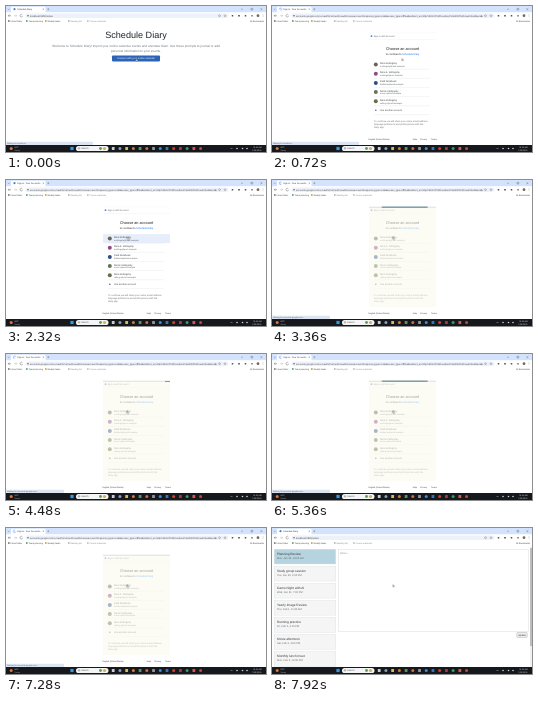
An HTML page for the animation above (8 s loop, 260 by 146 pixels).

```html
<!DOCTYPE html>
<html lang="en">
<head>
<meta charset="utf-8">
<title>Schedule Diary</title>
<style>
  html, body { margin: 0; width: 100%; height: 100%; overflow: hidden; background: #fff; }
  svg { display: block; }
  #stage { width: 260px; height: 146px; }
  text { font-family: Roboto, Arial, sans-serif; text-rendering: geometricPrecision; white-space: pre; }
  .plain { font-family: "Liberation Sans", Arial, sans-serif; }
  .bar rect { transform-box: fill-box; transform-origin: center; }
  #spin { transform-origin: 8.5px 3.2px; }
</style>
</head>
<body>
<svg id="stage" viewBox="0 0 260 146"></svg>
<script>
const LOOP = 8000;
const stage = document.getElementById('stage');

function add(parent, tag, attrs = {}) {
  const el = document.createElementNS('http://www.w3.org/2000/svg', tag);
  for (const k in attrs) el.setAttribute(k, attrs[k]);
  parent.append(el);
  return el;
}
const group = (p, attrs) => add(p, 'g', attrs);
const rect = (p, x, y, width, height, fill, more) => add(p, 'rect', { x, y, width, height, fill, ...more });
const dot = (p, cx, cy, r, fill) => add(p, 'circle', { cx, cy, r, fill });
const line = (p, d, stroke, width = 0.4) =>
  add(p, 'path', { d, stroke, 'stroke-width': width, fill: 'none' });
function text(p, x, mid, size, str, fill = '#444', more) {
  const el = add(p, 'text', { x, y: mid + size * 0.35, 'font-size': size, fill, ...more });
  el.textContent = str;
  return el;
}
const centered = { 'text-anchor': 'middle' };
const rightward = { 'text-anchor': 'end' };

// Holds each value until the next [time, value] step.
function hold(el, prop, steps) {
  const last = steps[steps.length - 1][1];
  const frames = [...steps, [LOOP, last]].map(([t, v]) =>
    ({ offset: t / LOOP, [prop]: v, easing: 'steps(1, end)' }));
  el.animate(frames, { duration: LOOP, iterations: Infinity });
}
function show(el, ...spans) {
  const steps = spans[0][0] > 0 ? [[0, 0]] : [];
  for (const [from, to] of spans) {
    steps.push([from, 1]);
    if (to < LOOP) steps.push([to, 0]);
  }
  hold(el, 'opacity', steps);
}

const CHOOSER = 560, CLICK = 2720, NOTES = 7360;

// Pages
const page = group(stage);
rect(page, 0, 18, 260, 121, '#fff');

function drawHome() {
  const g = group(page);
  text(g, 130, 29, 9.1, 'Schedule Diary', '#212529', { ...centered, class: 'plain' });
  const intro = [
    'Welcome to Schedule Diary! Import your online calendar events and annotate them. Use these prompts to journal or add',
    'personal information to your events.'];
  intro.forEach((s, i) => text(g, 130, 40 + i * 4.7, 3.15, s, '#6c757d', { ...centered, class: 'plain' }));
  rect(g, 106, 49.4, 48, 6, '#2a63b8', { rx: 0.8 });
  text(g, 130, 52.4, 2.5, 'Connect with your online calendar', '#fff', { ...centered, class: 'plain' });
  show(g, [0, CHOOSER]);
}

function drawChooser() {
  const g = group(page);
  line(g, 'M97 26.8H164', '#eceef0', 0.3);
  dot(g, 99.5, 30.2, 0.9, '#4285f4');
  text(g, 101.7, 30.2, 2.3, 'Sign in with Account', '#5f6368');
  line(g, 'M97 33.6H164', '#e4e6e9', 0.3);
  text(g, 130.7, 43, 3.9, 'Choose an account', '#202124', centered);
  const sub = text(g, 130.5, 48, 2.6, 'to continue to ', '#202124', centered);
  add(sub, 'tspan', { fill: '#1a73e8' }).textContent = 'Schedule Diary';

  const people = [
    ['Nora Vellingsby', 'nvellingsby@mail.example', '#6a6258'],
    ['Nora A. Vellingsby', 'nvellings@post.example', '#8d4a86'],
    ['Field Notebook', 'fieldnotes@mail.example', '#2b4f86'],
    ['Norrie Vellingsby', 'norrie.v@mail.example', '#66705f'],
    ['Nora Vellingsby', 'velling.n@mail.example', '#6d6a4c']];
  const hovers = [
    [[1250, 1300], [1830, CLICK]], [[1300, 1365], [1760, 1830]], [[1365, 1430], [1690, 1760]],
    [[1430, 1490], [1617, 1690]], [[1490, 1617]]];
  people.forEach(([name, mail, tone], i) => {
    const y = 58.6 + i * 9.15;
    const hover = rect(g, 97, y - 4.5, 67, 9, '#e6eefb');
    show(hover, ...hovers[i]);
    dot(g, 103.8, y, 2, tone);
    text(g, 108, y - 1.3, 2.45, name, '#3c4043');
    text(g, 108, y + 1.6, 2.1, mail, '#5f6368');
    line(g, `M102 ${y + 4.55}H158`, '#dadce0', 0.3);
  });
  dot(g, 103.8, 104.2, 0.8, '#5f6368');
  text(g, 108, 104.2, 2.4, 'Use another account', '#3c4043');
  line(g, 'M102 108.6H158', '#dadce0', 0.3);
  ['To continue, we will share your name, email address,',
   'language preference and profile picture with the',
   'diary app.'].forEach((s, i) =>
    text(g, 102, 115.3 + i * 3.1, 2.35, s, '#6a6e73'));
  text(g, 96.5, 133.5, 2.1, 'English (United States)', '#444');
  text(g, 140.7, 133.5, 2.1, 'Help', '#444');
  text(g, 148.3, 133.5, 2.1, 'Privacy', '#444');
  text(g, 159, 133.5, 2.1, 'Terms', '#444');

  const busy = group(g);
  rect(busy, 97, 27, 67, 100, '#fbfbef', { opacity: 0.6 });
  drawProgress(busy);
  show(busy, [CLICK, NOTES]);
  show(g, [CHOOSER, NOTES]);
}

// Indeterminate bar: each part slides while its length swells and shrinks.
function drawProgress(parent) {
  const W = 67;
  const box = add(parent, 'svg', { x: 97, y: 26.6, width: W, height: 1.2, overflow: 'hidden' });
  rect(box, 0, 0, W, 1.2, '#d3dedc');
  const timing = { duration: 2000, iterations: Infinity, delay: -1360 };
  const bez = e => e ? `cubic-bezier(${e})` : 'linear';
  function part(left, slide, size) {
    const g = group(box, { class: 'bar' });
    const r = rect(g, left * W, 0, W, 1.2, '#5d8093');
    g.animate(slide.map(([offset, x, e]) =>
      ({ offset, transform: `translateX(${x * W}px)`, easing: bez(e) })), timing);
    r.animate(size.map(([offset, s, e]) =>
      ({ offset, transform: `scaleX(${s})`, easing: bez(e) })), timing);
    show(g, [0, 6720]);
  }
  part(-1.4517,
    [[0, 0], [0.2, 0, '.5,0,.7,.5'], [0.5915, 0.8367, '.3,.38,.55,.96'], [1, 2.0061]],
    [[0, 0.08], [0.3665, 0.08, '.33,.12,.79,1'], [0.6915, 0.6615, '.06,.11,.6,1'], [1, 0.08]]);
  part(-0.5489,
    [[0, 0, '.15,0,.52,.41'], [0.25, 0.3765, '.31,.28,.8,.73'], [0.4835, 0.8439, '.4,.63,.6,.9'], [1, 1.6028]],
    [[0, 0.08, '.21,.06,.58,.45'], [0.1915, 0.4571, '.15,.2,.65,1'], [0.4415, 0.727, '.26,0,.21,1.38'], [1, 0.08]]);
}

function drawNotes() {
  const g = group(page);
  const events = [
    ['Planning Review', 'Mon, Jan 29, 10:00 AM'],
    ['Study group session', 'Tue, Jan 30, 2:00 PM'],
    ['Game Night with Al', 'Wed, Jan 31, 7:30 PM'],
    ['Yearly Image Review', 'Thu, Feb 1, 11:00 AM'],
    ['Running practice', 'Fri, Feb 2, 4:15 PM'],
    ['Movie afternoon', 'Sat, Feb 3, 3:00 PM'],
    ['Monthly lunch meet', 'Mon, Feb 5, 12:00 PM']];
  events.forEach(([name, when], i) => {
    const y = 21.2 + i * 17.05;
    rect(g, 2.2, y, 61.6, 14.8, i ? '#f5f5f5' : '#b5d4e0', { stroke: '#dcdfe1', 'stroke-width': 0.4 });
    text(g, 5, y + 4.6, 3.2, name, '#333', { class: 'plain' });
    text(g, 5, y + 8.9, 2.6, when, '#666', { class: 'plain' });
  });
  rect(g, 66.3, 21.2, 190.5, 82, '#fff', { stroke: '#d0d3d6', 'stroke-width': 0.4 });
  text(g, 68, 25, 2.6, 'Notes...', '#8a8f94', { class: 'plain' });
  rect(g, 244.8, 104.6, 10.4, 4.8, '#f3f3f3', { rx: 0.7, stroke: '#888', 'stroke-width': 0.35 });
  text(g, 250, 107, 2.4, 'Update', '#222', { ...centered, class: 'plain' });
  rect(g, 258, 18, 2, 121, '#f1f1f1');
  rect(g, 258.4, 20, 1.2, 98, '#9a9a9a');
  show(g, [NOTES, LOOP]);
}

// Browser frame
function drawBrowser() {
  const g = group(stage);
  rect(g, 0, 0, 260, 7, '#d3e3fd');
  rect(g, 0, 6.2, 260, 11.9, '#fff');
  rect(g, 5, 0.8, 34.5, 6, '#fff', { rx: 1.2 });
  line(g, 'M2 2.8l.8 .8 .8 -.8', '#444');
  line(g, 'M36.6 2.5l1.4 1.4M38 2.5l-1.4 1.4M41.3 3.2h2M42.3 2.2v2', '#444', 0.3);
  line(g, 'M235 3.2h2M245 2.3h1.7v1.7H245zM254.5 2.3l1.8 1.8M256.3 2.3l-1.8 1.8', '#333', 0.3);

  line(g, 'M5 9.7H2.2l1.2-1.2M2.2 9.7l1.2 1.2', '#444');
  line(g, 'M8 9.7h2.8l-1.2-1.2M10.8 9.7l-1.2 1.2', '#aaa');
  line(g, 'M16.4 9a1.3 1.3 0 1 0 .1 1.2', '#444');
  rect(g, 19.5, 7.4, 203, 4.6, '#edf2fa', { rx: 2.3 });
  dot(g, 22, 9.7, 0.8, '#5f6368');
  [213.5, 219].forEach(x => add(g, 'circle', { cx: x, cy: 9.7, r: 0.9, fill: 'none', stroke: '#555', 'stroke-width': 0.35 }));
  [[226.5, '#555'], [233, '#444'], [239.5, '#555'], [246, '#777']].forEach(([x, c]) =>
    rect(g, x - 0.8, 8.9, 1.6, 1.6, c, { rx: 0.3 }));
  dot(g, 252, 9.7, 1.4, '#77695c');
  [8.7, 9.7, 10.7].forEach(y => dot(g, 257, y, 0.28, '#444'));

  [[2, '#5f6368', 'Inbox folder'], [20, '#3c8a50', 'Team planning'], [39, '#c98d2b', 'Weekly tasks'],
   [62, '#aaa', 'Reading list'], [81, '#a9b8cc', 'Course materials']].forEach(([x, c, s], i) => {
    rect(g, x, 14.2, 1.6, 1.6, c, { rx: 0.3 });
    text(g, x + 2.6, 15.1, 2.2, s, i < 3 ? '#444' : '#888');
  });
  text(g, 258, 15.1, 2.2, 'All Bookmarks', '#444', rightward);

  const appTab = group(g), signTab = group(g);
  text(appTab, 11.3, 3.3, 2.25, 'Schedule Diary', '#333');
  text(appTab, 24, 9.7, 2.4, 'localhost:3000/notes', '#333');
  text(signTab, 11.3, 3.3, 2.25, 'Sign in - Your Accounts', '#333');
  const url = add(signTab, 'svg', { width: 211, height: 18, overflow: 'hidden' });
  text(url, 24, 9.7, 2.4, 'accounts.google.com/o/oauth2/v2/auth/oauthchooseaccount?response_type=code&access_type=offline' +
    '&redirect_uri=http%3A%2F%2Flocalhost%3A3000%2Foauth2callback&scope=openid%20email%20profile&service=lso&flow=GeneralOAuthFlow', '#444');
  show(appTab, [0, CHOOSER], [NOTES, LOOP]);
  show(signTab, [CHOOSER, NOTES]);

  const icon = dot(g, 8.5, 3.2, 1.1, '#5b7fa8');
  const spin = line(g, 'M8.5 2a1.2 1.2 0 1 1 -1.2 1.2', '#1a73e8', 0.5);
  spin.id = 'spin';
  spin.animate({ transform: ['rotate(0deg)', 'rotate(360deg)'] }, { duration: 1000, iterations: Infinity });
  show(spin, [80, 2200], [CLICK, 7840]);
  show(icon, [0, 80], [2200, CLICK], [7840, LOOP]);
}

function drawStatus() {
  function bubble(width, str, ...spans) {
    const g = group(stage);
    rect(g, -1, 135.8, width + 1, 3.2, '#dce5f1', { rx: 0.4 });
    text(g, 1, 137.4, 2, str, '#5f6368');
    show(g, ...spans);
  }
  bubble(87, 'Waiting for localhost...', [0, 2320]);
  bubble(58, 'Waiting for accounts.google.com...', [CLICK, NOTES]);
}

function drawTaskbar() {
  const g = group(stage);
  rect(g, 0, 139, 260, 7, '#15191d');
  dot(g, 5.2, 142.5, 1.5, '#d9763a');
  text(g, 8.5, 141.4, 2, '54°F', '#ddd');
  text(g, 8.5, 143.8, 2, 'Sunny', '#aaa');
  rect(g, 64.4, 140.9, 3.2, 3.2, '#2f9be8');
  rect(g, 70, 139.9, 32.5, 5.2, '#f3f5f6', { rx: 2.6 });
  add(g, 'circle', { cx: 73, cy: 142.4, r: 0.8, fill: 'none', stroke: '#333', 'stroke-width': 0.35 });
  text(g, 75.3, 142.5, 2.4, 'Search', '#555');
  dot(g, 94.5, 142.5, 1.4, '#5f9a54');
  dot(g, 98.5, 142.5, 1.6, '#d4b053');
  ['#c9ced3', '#8d9fae', '#e5b94a', '#c9803f', '#5f8f6a', '#d66b3a', '#8f979e',
   '#3c8fd6', '#3273c4', '#c4453a', '#a63a3a', '#3d9a5c', '#d7574c', '#c4473c'].forEach((c, i) => {
    const x = 107.2 + i * 6.72;
    i % 2 ? dot(g, x, 142.5, 1.5, c) : rect(g, x - 1.4, 141.1, 2.8, 2.8, c, { rx: 0.5 });
  });
  line(g, 'M224.5 143l1-1 1 1', '#ddd');
  [231, 236.5, 241].forEach(x => dot(g, x, 142.5, 0.8, '#cfd3d7'));
  text(g, 255.5, 141.4, 2, '10:42 AM', '#ddd', rightward);
  text(g, 255.5, 143.8, 2, '1/29/2024', '#ddd', rightward);
}

function drawCursor() {
  const g = group(stage);
  const pointer = group(g, { transform: 'scale(0.6)' });
  const ink = { fill: '#fff', stroke: '#111', 'stroke-width': 0.5, 'stroke-linejoin': 'round' };
  const hand = add(pointer, 'path', { d: 'M0 0q.5-.5 .9 0v1.5l1.6.5q.4.2.3.7l-.4 1.7H.2L-1 2.6q.1-.6.6-.3l.4.4z', ...ink });
  const arrow = add(pointer, 'path', { d: 'M0 0v3.3l.8-.7.5 1.2.6-.3-.5-1.1h1z', ...ink });
  show(hand, [0, CHOOSER], [1250, NOTES]);
  show(arrow, [CHOOSER, 1250], [NOTES, LOOP]);
  const path = [[0, 130, 52.5], [1200, 130, 52.5], [1300, 131, 63], [1550, 131, 99], [1840, 129, 62],
    [1920, 128, 58], [2000, 127, 57.5], [2240, 126, 57], [2320, 122, 57.2], [2560, 121, 56.7], [LOOP, 121, 56.7]];
  g.animate(path.map(([t, x, y]) => ({ offset: t / LOOP, transform: `translate(${x}px, ${y}px)` })),
    { duration: LOOP, iterations: Infinity });
}

drawHome();
drawChooser();
drawNotes();
drawBrowser();
drawStatus();
drawTaskbar();
drawCursor();
</script>
</body>
</html>
```
